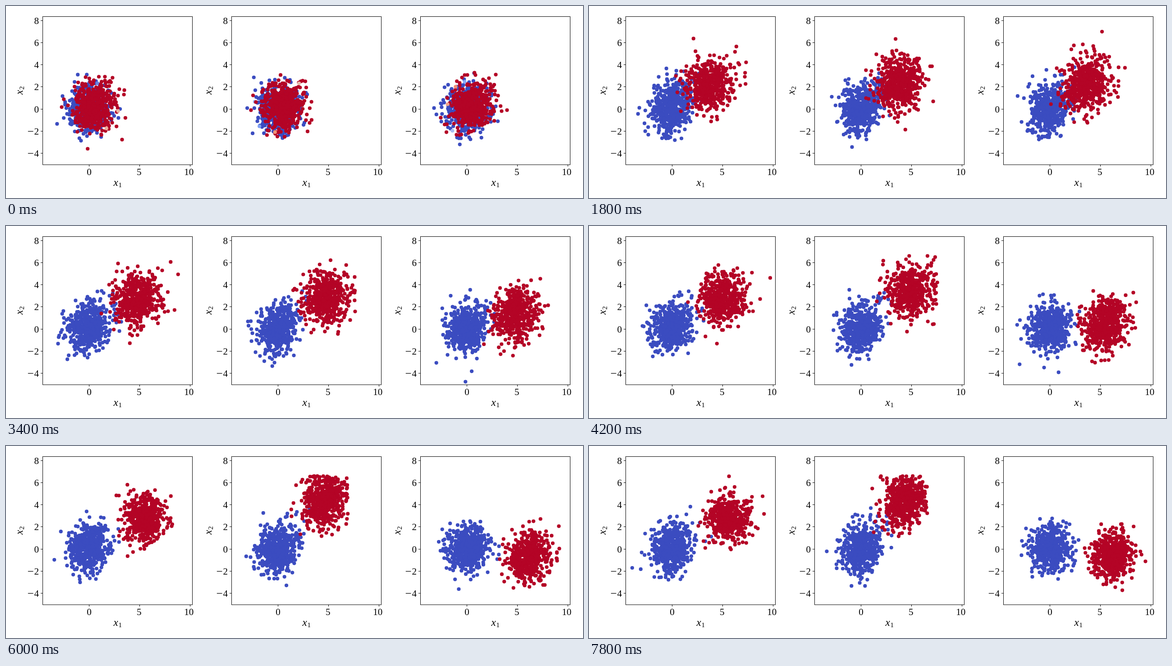
Recreate the animation shown at these times as an HTML page with a canvas. Size 1280 by 427 pixels, loop 8000 ms.

```html
<!DOCTYPE html>
<html>
<head>
<meta charset="utf-8">
<style>
html, body { margin: 0; width: 100%; height: 100%; overflow: hidden; background: #fff; }
canvas { display: block; }
</style>
</head>
<body>
<canvas id="stage" width="1280" height="427"></canvas>
<script>
const ctx = document.getElementById('stage').getContext('2d');
const STEPS = 40, STEP_MS = 200, COUNT = 520, PALE = 2, KEEP = 0.95, RADIUS = 4.1;
const COOLWARM = [[59, 76, 192], [141, 176, 254], [221, 221, 221], [244, 152, 122], [180, 4, 38]];

// All red clouds rise together, then turn by (dx, dy) over their own spans of steps.
const PANELS = [
  { left: 81, dx: 0, dy: 0, xSpan: [0, 1], ySpan: [0, 1], tail: .6 },
  { left: 500, dx: -1.15, dy: 1.5, xSpan: [15, 24], ySpan: [14, 14], tail: 1, walled: true },
  { left: 919, dx: .75, dy: -3.4, xSpan: [15, 12], ySpan: [8, 21], tail: 0 }
];

let seed = 20;
function random() {
  seed = (seed + 0x6D2B79F5) | 0;
  let t = Math.imul(seed ^ (seed >>> 15), 1 | seed);
  t = (t + Math.imul(t ^ (t >>> 7), 61 | t)) ^ t;
  return ((t ^ (t >>> 14)) >>> 0) / 4294967296;
}

function polar(r) {
  const a = 2 * Math.PI * random();
  return [r * Math.cos(a), r * Math.sin(a)];
}

const gauss = () => polar(Math.sqrt(-2 * Math.log(1 - random())));

// A slowly wandering pair of normal variables.
function walk(z) {
  const path = [z], kick = Math.sqrt(1 - KEEP * KEEP);
  for (let i = 1; i < STEPS; i++) {
    const n = gauss();
    path.push(z = z.map((v, j) => KEEP * v + kick * n[j]));
  }
  return path;
}

function makeDots(isRed) {
  return Array.from({ length: COUNT }, (_, i) => {
    const pale = i >= COUNT - PALE;
    const offset = pale ? .12 + .3 * random() : 0;
    return { path: walk(pale ? polar(2.4) : gauss()), tone: isRed ? 1 - offset : offset };
  });
}

for (const panel of PANELS) panel.groups = [false, true].map(isRed => ({ isRed, dots: makeDots(isRed) }));

function ease(u) {
  u = Math.min(1, Math.max(0, u));
  return u * u * (3 - 2 * u);
}

const fold = (v, wall) => v > wall ? 2 * wall - v : v;

// Returns the function that maps a normal pair to plot coordinates.
function cloud(panel, isRed, step) {
  const turn = ([start, span]) => ease((step - start) / span);
  const stretch = ease(step / 6) * (1 - ease((step - 12) / 22));
  const turnX = turn(panel.xSpan), turnY = turn(panel.ySpan);
  if (!isRed) {
    const tail = ease(step / 5) * (1 + (panel.tail - 1) * ease((step - 9) / 20));
    const spread = 1.03 + .08 * tail;
    return ([a, b]) => [a, spread * b + .1 * tail * a + .2 * tail * Math.max(0, a) ** 2];
  }
  const mx = 5.6 - 5.1 * Math.exp(-step / 9) + panel.dx * turnX;
  const my = 2.8 - 2.5 * Math.exp(-step / 6) + panel.dy * turnY;
  const sx = 1.02 + .13 * stretch;
  const sy = 1.03 + .2 * stretch + (panel.walled ? .2 * turnX : 0);
  return ([a, b]) => {
    const x = mx + sx * a, y = my + sy * (b + .08 * a);
    return panel.walled ? [fold(x, 7.75 - 1.2 * turnX), fold(y, 6.65)] : [x, y];
  };
}

function colour(v) {
  const k = Math.min(3, Math.floor(v * 4)), u = v * 4 - k;
  return `rgb(${COOLWARM[k].map((c, j) => Math.round(c + (COOLWARM[k + 1][j] - c) * u))})`;
}

const toX = x => 103.7 + 22.4 * x;
const toY = y => 229 - 24.53 * y;

function drawDots(panel, step) {
  const fade = Math.max(0, 1 - step / 4);
  for (const { isRed, dots } of panel.groups) {
    const place = cloud(panel, isRed, step);
    for (const { path, tone } of dots) {
      const [x, y] = place(path[step]);
      ctx.fillStyle = colour(+isRed + (tone - isRed) * fade);
      ctx.beginPath();
      ctx.arc(toX(x), toY(y), RADIUS, 0, 2 * Math.PI);
      ctx.fill();
    }
  }
}

function text(s, x, y, size, align = 'center', style = '') {
  ctx.font = `${style} ${size}px "Liberation Serif", serif`;
  ctx.textAlign = align;
  ctx.fillText(s, x, y);
}

function axisName(index, x, y, angle) {
  ctx.save();
  ctx.translate(x, y);
  ctx.rotate(angle);
  text('x', 0, 0, 23, 'left', 'italic');
  text(index, 11, 3, 15, 'left');
  ctx.restore();
}

function drawAxes() {
  ctx.fillStyle = ctx.strokeStyle = '#000';
  ctx.lineWidth = 1;
  ctx.strokeRect(.5, 23.5, 332, 329.5);
  ctx.beginPath();
  for (let v = 0; v <= 10; v += 5) {
    const x = Math.floor(toX(v)) + .5;
    ctx.moveTo(x, 353);
    ctx.lineTo(x, 357);
    text(v, x - .27 * v, 376, 21);
  }
  for (let v = -4; v <= 8; v += 2) {
    const y = Math.floor(toY(v)) + .5;
    ctx.moveTo(-4, y);
    ctx.lineTo(0, y);
    text(Math.abs(v), -8, y + 7, 21, 'right');
    if (v < 0) text('−', -19.5, y + 8, 25, 'right');
  }
  ctx.stroke();
  axisName(1, 157.5, 400, 0);
  axisName(2, -44, 197, -Math.PI / 2);
}

let shown = -1;
function frame() {
  const step = Math.floor(performance.now() / STEP_MS) % STEPS;
  if (step !== shown) {
    shown = step;
    ctx.fillStyle = '#fff';
    ctx.fillRect(0, 0, 1280, 427);
    for (const panel of PANELS) {
      ctx.save();
      ctx.translate(panel.left, 0);
      drawDots(panel, step);
      drawAxes();
      ctx.restore();
    }
  }
  requestAnimationFrame(frame);
}
frame();
</script>
</body>
</html>
```
